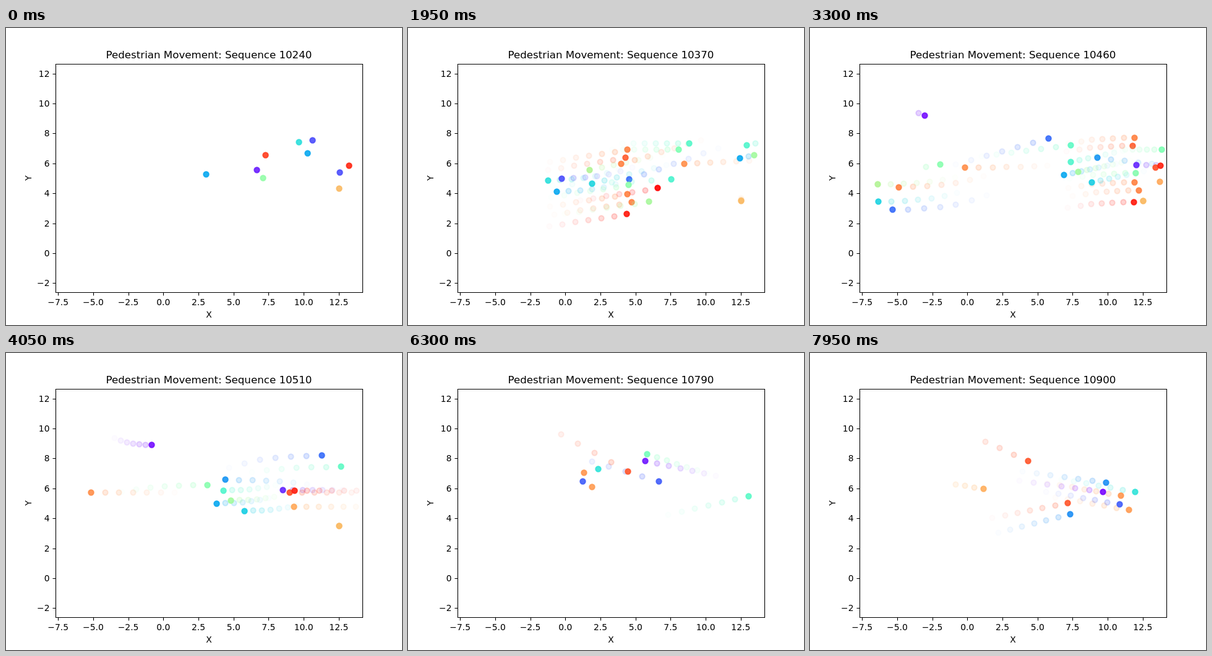
Write an HTML page that moves like this. It is 640 px wide and 480 px high and loops after 8000 ms.

```html
<!DOCTYPE html>
<html lang="en">
<head>
<meta charset="utf-8">
<title>Pedestrian Movement</title>
<style>
  html, body { margin: 0; width: 100%; height: 100%; overflow: hidden; background: #fff; }
  svg { display: block; width: 640px; height: 480px; }
  text { font: 13.89px "DejaVu Sans", sans-serif; text-anchor: middle; }
  #title { font-size: 16.67px; }
  #axes path { fill: none; stroke: #000; stroke-width: 1.1; }
  #dots { stroke-width: 2.08; }
</style>
</head>
<body>
<svg viewBox="0 0 640 480">
  <g id="dots"></g>
  <g id="axes"></g>
  <text id="title" x="328" y="49"></text>
  <text x="328" y="468">X</text>
  <text transform="translate(41 242.5) rotate(-90)">Y</text>
</svg>
<script>
const LOOP = 8000, STEP = 150, TRAIL = 6, LEFT = 85, RIGHT = 570;
const dots = document.getElementById('dots');
const title = document.getElementById('title');
const walkers = [];

// A crowd shares a heading (go, px per step), the step its places hold (at),
// its first and last step (life) and a change of pace after that step.
// Each walker is [hue, x, y], with its own heading where it differs.
function crowd({ at, life, go, pace = 1 }, ...people) {
  for (const [hue, x, y, vx = go[0], vy = go[1]] of people)
    walkers.push({ hue, x, y, vx, vy, at, life, pace });
}

// Early walkers, and one who stands by the right edge
crowd({ at: 0, life: [0, 11], go: [18, 0] },
  [.23, 323, 236, 26, -1.6], [.92, 419, 205, 21], [.04, 405, 229],
  [.54, 415, 242], [.1, 539, 233], [.95, 554, 222]);
crowd({ at: 8, life: [0, 15], go: [-19, 6.3] },
  [.34, 321, 234], [.1, 343, 231], [.23, 335, 252]);
crowd({ at: 8, life: [0, 30], go: [0, 2] }, [.74, 538, 275]);

// Two large crowds pass through each other
crowd({ at: 17, life: [1, 27], go: [-21, 5], pace: 1.07 },
  [.31, 217, 271, -20], [.6, 214, 245, -19.7, 4], [.83, 258, 245, -21.5, 6.4],
  [.14, 261, 278, -24, 8.4], [.81, 362, 223, -21, 1]);
crowd({ at: 17, life: [7, 30], go: [20.9, -3.3], pace: .82 },
  [.83, 438, 183], [.88, 435, 196], [.4, 553, 238, 32, -1.6],
  [.53, 440, 240], [.83, 438, 255], [.83, 445, 268],
  [.97, 437, 287], [1, 487, 245], [.58, 479, 267, 22.6]);
crowd({ at: 17, life: [5, 30], go: [18, 0], pace: .65 },
  [.42, 526, 186], [.5, 509, 196]);
crowd({ at: 17, life: [17, 18], go: [24, 0] }, [.4, 566, 217], [.94, 567, 214]);

// Later arrivals from both sides
crowd({ at: 22, life: [12, 30], go: [-14, 3] },
  [.41, 421, 216], [.3, 455, 249], [.23, 410, 237], [.57, 433, 232],
  [.2, 464, 209, -22, -2.6], [.05, 527, 221, -16, 0]);
crowd({ at: 22, life: [22, 30], go: [-20, 0] },
  [.9, 558, 225], [.96, 566, 222], [.77, 565, 248]);
crowd({ at: 22, life: [15, 30], go: [24, -3] },
  [.44, 421, 189], [.14, 385, 178, 25, -7]);
crowd({ at: 22, life: [21, 30], go: [23, -4] },
  [.52, 210, 220], [.02, 185, 141, 10, 4]);

// After the gap in the recording
crowd({ at: 32, life: [31, 42], go: [21, 8] },
  [.49, 370, 186, 22, 1], [.76, 412, 193], [.66, 407, 214],
  [.96, 466, 253, 17, -2], [.38, 268, 326, -23, 10]);
crowd({ at: 32, life: [32, 41], go: [35, -1.5] },
  [.22, 220, 216], [.08, 228, 243], [.42, 211, 267], [.86, 192, 271]);
crowd({ at: 42, life: [31, 49], go: [-18, -5] },
  [.48, 386, 163, -16.1, -5.2], [.03, 383, 174, -19, -4], [.43, 550, 231, 21.7]);
crowd({ at: 42, life: [38, 53], go: [27, 8] }, [.12, 405, 207], [.89, 355, 191, 27, 15]);
crowd({ at: 53, life: [42, 53], go: [19.8, 3.4] },
  [.35, 525, 224], [.8, 502, 230], [.79, 515, 253], [.12, 500, 244]);
crowd({ at: 53, life: [43, 53], go: [22.5, 3] },
  [.01, 473, 224], [.19, 478, 209], [.19, 420, 260, 19.4, -5], [.89, 416, 242, 20.3, -4]);
crowd({ at: 53, life: [50, 53], go: [23, 10.5] }, [.89, 352, 174], [.76, 280, 219, 15, 2.5]);

// Rainbow colour map
function rainbow(h) {
  const rgb = [Math.abs(2 * h - .5), Math.sin(Math.PI * h), Math.cos(Math.PI * h / 2)];
  return `rgb(${rgb.map(v => Math.round(255 * v))})`;
}

// Walkers go straight and level out once past their known place.
function place(w, step) {
  if (step < w.life[0] || step > w.life[1]) return null;
  const t = step - w.at, past = t > 0;
  const x = w.x + w.vx * t * (past ? w.pace : 1);
  const y = w.y + w.vy * (past ? 2 * (1 - Math.exp(-t / 2)) : t);
  return x > LEFT && x < RIGHT ? [Math.round(x) + .5, Math.round(y) + .5] : null;
}

// Face and edge overlap, so faint dots show a ring.
const dot = ([x, y], alpha) =>
  `<circle cx="${x}" cy="${y}" r="4.17" fill-opacity="${alpha}" stroke-opacity="${alpha}"/>`;

function drawWalker(w, step) {
  const now = place(w, step);
  if (!now) return '';
  const color = rainbow(w.hue);
  let out = `<g fill="${color}" stroke="${color}">`;
  for (let age = TRAIL; age > 0; age--) {
    const p = place(w, step - age);
    if (p) out += dot(p, .22 - .034 * age);
  }
  return out + dot(now, .9) + '</g>';
}

function drawAxes() {
  let lines = 'M80.5 58.5H576.5V427.5H80.5Z', labels = '';
  const name = (v, digits) => (v < 0 ? '\u2212' : '') + Math.abs(v).toFixed(digits);
  for (let v = -7.5; v <= 12.5; v += 2.5) {
    const x = 254.3 + 22.68 * v;
    lines += `M${Math.round(x) + .5} 427.5v5`;
    labels += `<text x="${x}" y="448">${name(v, 1)}</text>`;
  }
  for (let v = -2; v <= 12; v += 2) {
    const y = Math.round(364 - 24.2 * v);
    lines += `M80.5 ${y + .5}h-5`;
    labels += `<text x="70.5" y="${y + 5}" style="text-anchor:end">${name(v, 0)}</text>`;
  }
  document.getElementById('axes').innerHTML = `<path d="${lines}"/>${labels}`;
}

let shown = -1;
function frame() {
  const step = Math.floor(performance.now() % LOOP / STEP);
  if (step !== shown) {
    shown = step;
    const seq = 10240 + 10 * step + (step > 30 ? 130 : 0);
    title.textContent = `Pedestrian Movement: Sequence ${seq}`;
    dots.innerHTML = walkers.map(w => drawWalker(w, step)).join('');
  }
  requestAnimationFrame(frame);
}

drawAxes();
frame();
</script>
</body>
</html>
```
